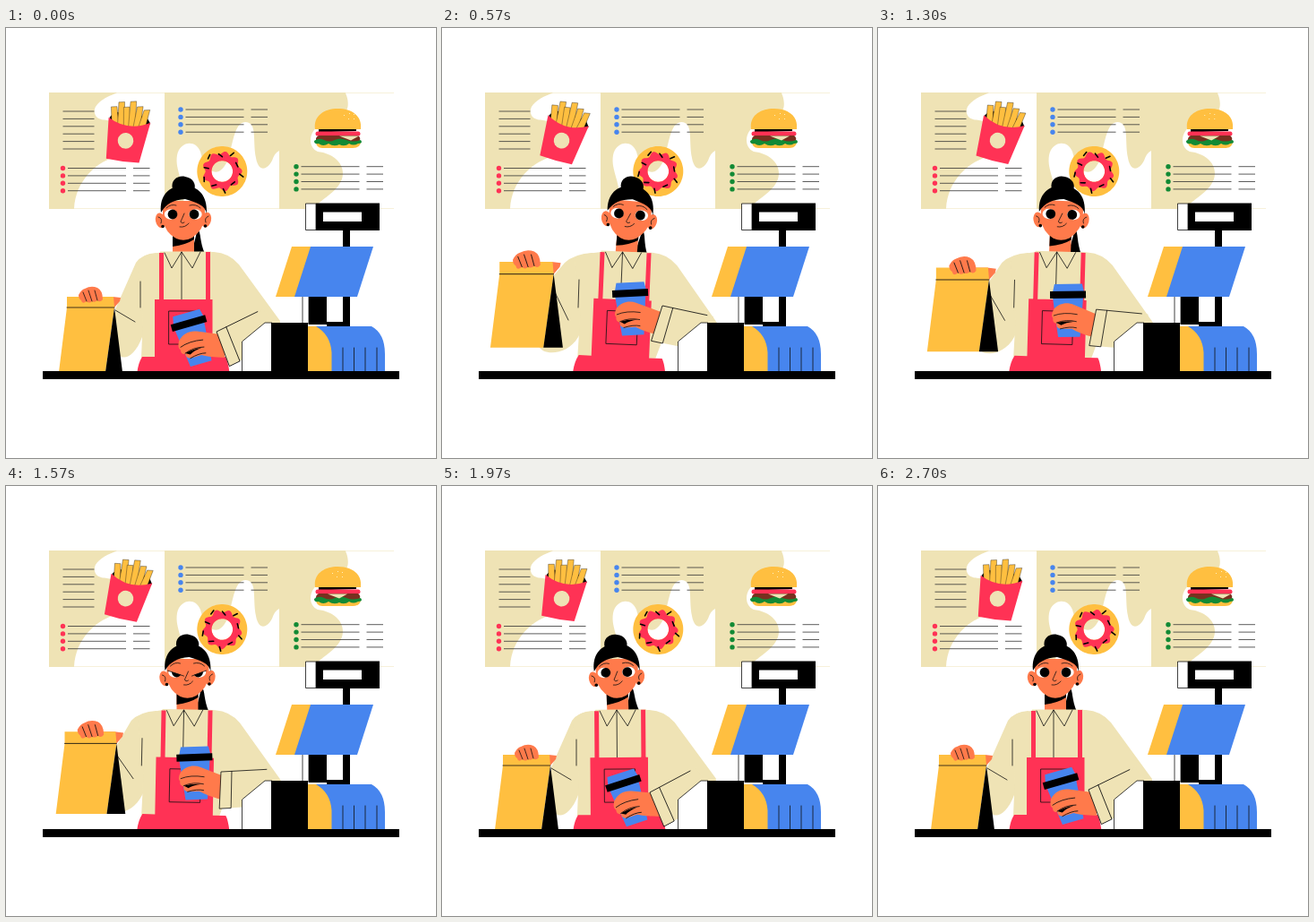
An HTML page that plays this animation: 480x480 px, repeating every 2730 ms.

```html
<!DOCTYPE html>
<html lang="en">
<head>
<meta charset="utf-8">
<title>Snack counter</title>
<style>
  html, body { margin: 0; width: 100%; height: 100%; overflow: hidden; background: #fff; }
  svg { display: block; width: 100%; height: 100%; }
  .beige { fill: #efe3b5; }
  .yellow { fill: #ffbf40; }
  .red { fill: #ff3255; }
  .blue { fill: #4785ee; }
  .green { fill: #128a35; }
  .skin { fill: #ff7a4b; }
  .white { fill: #fff; }
  .line { fill: none; stroke: #111; stroke-width: .8; stroke-linecap: round; stroke-linejoin: round; }
  .menu { stroke: #333; stroke-width: .8; }
</style>
</head>
<body>
<svg viewBox="0 0 480 480">
  <defs><clipPath id="aboveCounter"><path d="M0 0H480V383.500H0Z"/></clipPath></defs>

  <!-- menu boards -->
  <path class="beige" d="M48 72H433V202H48Z"/>
  <g class="white">
    <path d="M124 72.500C108 78 97 86 99 95C101 104 112 102 118 104V145C100 152 78 170 76 201.500H177V72.500Z"/>
    <path d="M198 201.500C201 172 188 160 191 142C194 126 212 124 217 138C222 160 238 172 248 146C254 126 255 106 267 105C281 105 275 125 279 145C282 162 292 158 297 148Q300 139 305 137V201.500Z"/>
    <path d="M379 72.500C384 84 382 95 375 95L350 108C336 118 338 134 348 138C365 140 376 150 376 162C376 181 352 190 343 201.500H434V72.500Z"/>
  </g>
  <g id="menu"></g>

  <g id="fries">
    <path d="M-22-24L-17-31L19-29L24-22L15-10H-15Z"/>
    <g id="sticks"></g>
    <path class="red" d="M-23-24Q0-10 24-23L16 23Q-3 24-21 22Z"/>
    <circle class="beige" cx="-1.500" r="8.800"/>
  </g>

  <g id="donut">
    <path id="dough" class="yellow" fill-rule="evenodd"/>
    <path id="icing" class="red" fill-rule="evenodd"/>
    <g id="sprinkles" stroke="#000" stroke-width="1.600" stroke-linecap="round"></g>
  </g>

  <g id="burger">
    <path class="yellow" d="M345 113C343 98 355 90 370.500 90S398 98 396 113ZM346 126H396Q396 134 387 134H353Q346 134 346 126Z"/>
    <path d="M349 113H391V115L349 116.500Z"/>
    <rect class="red" x="345.500" y="115.500" width="50" height="5" rx="2.500"/>
    <path fill="#78301f" d="M349 120H393Q397 123 394 127H347Q344 123 349 120Z"/>
    <path class="green" d="M344 126Q349 122 355 125T367 125T380 125T396 125Q399 129 393 129Q388 132 383 129Q378 133 372 130Q366 133 360 129Q354 133 349 129Q344 130 344 126Z"/>
    <g id="filling">
      <path class="beige" d="M360 120.500H382L373 125.500Z"/>
      <path fill="none" stroke="#fff0c0" stroke-width="1" d="M365 97l1 1m5-3l1 1m4 1l1-1m-7 5l1 1m5 0l1-1"/>
    </g>
  </g>

  <g clip-path="url(#aboveCounter)">
    <g id="head">
      <path d="M214 224C218 229 216 238 222 252H207Z"/>
      <path class="skin" d="M186 228H210V254H186Z"/>
      <path d="M186 232Q199 240 210 231V236Q201 242 186 244Z"/>
      <g class="skin">
        <ellipse cx="172.500" cy="215" rx="5.500" ry="8.500" transform="rotate(-12 172 215)"/>
        <ellipse cx="223.500" cy="214" rx="5.500" ry="8.500" transform="rotate(12 223 214)"/>
        <path d="M175 193V214Q178 229 190 235Q199 239 208 234Q221 225 222 210V193Z"/>
      </g>
      <path class="line" d="M170 211Q175 212 173 218M226 210Q221 212 223 217"/>
      <circle cx="175" cy="221.500" r="1.800"/><circle cx="222.500" cy="221" r="1.800"/>
      <ellipse class="white" cx="184" cy="208" rx="7.200" ry="5.700"/>
      <ellipse class="white" cx="211.500" cy="208" rx="7.200" ry="5.700"/>
      <circle cx="186" cy="208" r="5.400"/><circle cx="210" cy="208" r="5.400"/>
      <g id="lids">
        <path class="skin" d="M176 197H195V212L176 206ZM202 212L219 206V197H202Z"/>
        <path class="line" d="M176 206L194 212M203 212L219 206"/>
      </g>
      <path class="line" d="M179 201Q184 196 190 198M205 198Q212 196 217 201M199 207Q196 214 195 216Q196 219 199 217M194 222Q200 223 204 218"/>
      <path d="M173 206C171 186 183 176 198 176C215 176 225 187 224 207C222 198 214 195 200 191C187 192 179 196 173 206Z"/>
      <path d="M186 180C183 169 193 164 200 166C208 167 213 174 210 181Z"/>
    </g>

    <path id="leftSleeve" class="beige"/>
    <path id="body" class="beige" d="M164 252Q175 250 180 250H232Q249 251 260 264L306 327V340H248L238 368H151L153 320L146 262Q152 253 164 252Z"/>
    <g id="torso">
      <path class="beige" d="M172 249.500H229V305H172Z"/>
      <path class="line" d="M196 250V303M177 251L185 268L196 250L208 268L217 250"/>
      <path class="red" d="M171 251H176V304H171ZM223 250H228V304H223ZM166 303H230.500V367H245Q248 372 250 388H146Q147 375 152 367H166Z"/>
      <path class="line" d="M182 316H216V353H182Z"/>
    </g>
    <path id="sleeveCreases" class="line"/>

    <g id="cup">
      <path class="blue" d="M-15-30H16L18-21H-17ZM-17-15H17L13 29H-11.500Z"/>
      <path d="M-20-22H20V-14H-20Z"/>
      <path class="skin" d="M-16-2C-10-9-1-10 6-7L34 5L28 30C16 26 11 24 4 20H-8Q-14 19-13 14Q-18 13-17 8Q-20 5-16-2Z"/>
      <path d="M-13 13Q-4 11 7 12Q-3 13-8 16Z"/>
      <path class="line" d="M-16 5Q-5 1 10 4M-13 13Q-2 9 9 12M-9 20Q2 17 9 19"/>
    </g>
    <g id="forearm">
      <path class="beige" d="M0 0H58L64 40L-4 41Z"/>
      <path class="line" d="M51 0H0L-4 41H9L12 0"/>
    </g>

    <g id="bag">
      <path class="skin" d="M24 0L33 1L32 5L26 12H12V0Z"/>
      <path class="yellow" d="M-27 0H25L26 12L16 84H-36L-27 12Z"/>
      <path d="M26 12L35 84H16Z"/>
      <path class="line" d="M-27 12H26"/>
      <path class="skin" d="M-14-2Q-11-8-7-9Q0-13 7-10Q13-7 13 3Q10 7 7 4Q4 7 1 5Q-2 8-5 5Q-10 9-11 4Q-14 2-14-2Z"/>
      <path class="line" d="M-9-5L-5 5M-3-7L1 5M4-7L7 4"/>
    </g>
  </g>

  <!-- till -->
  <path d="M376 225H384V333H358V328H376Z"/>
  <path d="M338 298H358V331H338ZM346 195.500H417V226H346Z"/>
  <path class="white" stroke="#111" stroke-width=".8" d="M334.500 196H346V225.500H334.500ZM331 299H338V330H331Z"/>
  <path class="white" d="M354 205.500H397V216H354Z"/>
  <path class="yellow" d="M319 244H341L323 300H301Z"/>
  <path class="blue" d="M340 244H410L392 300H322Z"/>
  <path class="white" stroke="#111" stroke-width=".8" d="M263.500 384V350L289 329H297V384Z"/>
  <path d="M296 329H337V384H296Z"/>
  <path class="yellow" d="M337 333H350L364 350V384H337Z"/>
  <path class="blue" d="M346 333H408Q423 341 423 364V384H363.500V362Q362 342 346 333Z"/>
  <path class="line" d="M376 357V383M388.500 357V383M401 357V383M414 357V383"/>
  <path d="M41 383H439V392H41Z"/>
</svg>
<script>
const LOOP = 2730;
const $ = id => document.getElementById(id);
const set = (id, name, value) => $(id).setAttribute(name, value);
const move = (id, value) => set(id, 'transform', value);

const rules = (x, y, width) => `<path class="menu" d="M${x} ${y}h${width}"/>`;
const menuList = (color, x, y) => [0, 8.4, 16.8, 25.2].map(dy =>
  `<circle class="${color}" cx="${x}" cy="${y + dy}" r="2.700"/>` +
  rules(x + 5.5, y + dy, 65) + rules(x + 78.5, y + dy, 18.5)).join('');
$('menu').innerHTML =
  Array.from({ length: 6 }, (_, i) => rules(63.5, 93 + i * 8.4, 35)).join('') +
  menuList('red', 63.5, 156.5) + menuList('blue', 195, 91) + menuList('green', 324, 154.7);

// Each stick: foot x, top x, top y
$('sticks').innerHTML = [[-14, -18, -37], [-8, -10, -43], [-1, -4, -38], [4, 3, -45], [9, 11, -40], [14, 19, -37]]
  .map(([x, tx, ty]) => `<path class="yellow" stroke="#111" stroke-width=".35" d="M${x - 4}-12L${tx - 3.5} ${ty + 1}L${tx + 3} ${ty}L${x + 4}-12Z"/>`).join('');

// Closed ring outline; a wavy rim when lobes and depth are given.
function ring(radius, lobes = 0, depth = 0) {
  const points = Array.from({ length: 90 }, (_, i) => {
    const a = i * Math.PI / 45, r = radius + depth * Math.cos(lobes * a);
    return `${(r * Math.cos(a)).toFixed(1)} ${(r * Math.sin(a)).toFixed(1)}`;
  });
  return `M${points.join('L')}Z`;
}
const hole = ring(11.8);
set('dough', 'd', ring(28) + hole);
set('icing', 'd', ring(20.5, 9, 1.9) + hole);
$('sprinkles').innerHTML = Array.from({ length: 10 }, (_, i) =>
  `<path d="M-2.500 0H2.500" transform="rotate(${i * 36 + 12}) translate(${i % 2 ? 18 : 22}) rotate(${i * 67 + 25})"/>`).join('');

const keyTimes = [0, 330, 570, 970, 1570, 1970, 2700, 2730];
const poses = {
  lift:  [0, .84, 1, .95, .66, 0, 0, 0],
  lean:  [0, 2.2, 2.4, 2, 1.1, -.4, 0, 0],
  headX: [0, 9, 11, 8.5, 4.5, -3, 0, 0],
  headR: [0, 2.5, 5, 4.5, 0, -2, 0, 0],
  cupX:  [209, 210, 211, 213, 211, 208, 209, 209],
  cupY:  [347, 339, 314, 313, 321, 349, 347, 347],
  cupR:  [-16, -15, -3, 0, -2, -18, -16, -16],
  cuffX: [235, 237, 246, 246, 240, 232, 235, 235],
  cuffY: [339, 331, 310, 311, 319, 342, 339, 339],
  armR:  [-26, -14, 12, 11, -3, -28, -26, -26],
  fries: [6, 11, 14, 14, 12, 8, 6, 6],
  seeds: [12, 9, 6, 0, -1, 4, 12, 12]
};

// Smooth interpolation that never overshoots its keys.
function sample(values, t) {
  const slope = i => (values[i + 1] - values[i]) / (keyTimes[i + 1] - keyTimes[i]);
  const tangent = i => {
    if (i === 0 || i === keyTimes.length - 1) return 0;
    const a = slope(i - 1), b = slope(i);
    return a * b > 0 ? 2 * a * b / (a + b) : 0;
  };
  let i = 0;
  while (t >= keyTimes[i + 1]) i++;
  const span = keyTimes[i + 1] - keyTimes[i], u = (t - keyTimes[i]) / span;
  const ease = u * u * (3 - 2 * u);
  return values[i] + (values[i + 1] - values[i]) * ease +
    span * u * (1 - u) * ((1 - u) * tangent(i) - u * tangent(i + 1));
}

function draw(t) {
  const p = {};
  for (const name in poses) p[name] = sample(poses[name], t);
  const l = p.lift;

  move('fries', `translate(135 126) rotate(${p.fries})`);
  move('donut', `translate(241.300 160) rotate(${(p.fries - 6) * 2})`);
  move('filling', `translate(${p.seeds})`);
  move('head', `translate(${p.headX}) rotate(${p.headR} 198 213)`);
  move('torso', `rotate(${p.lean} 198 383)`);
  move('body', `rotate(${p.lean / 2} 198 383)`);
  move('cup', `translate(${p.cupX} ${p.cupY}) rotate(${p.cupR})`);
  move('forearm', `translate(${p.cuffX} ${p.cuffY}) rotate(${p.armR})`);
  move('bag', `translate(95 ${300 - 39 * l}) scale(${1 + .14 * l})`);

  set('leftSleeve', 'd', `M168 251Q${152 - 4 * l} 252 ${145 - 8 * l} 262L${122 + 3 * l} ${314 - 38 * l}L${122 - 14 * l} 355` +
    `C${124 - 12 * l} ${374 - 8 * l} ${142 - 2 * l} ${372 - 6 * l} 152 345L165 320Z`);
  set('sleeveCreases', 'd', `M${150 + 3 * l} ${283 - 2 * l}L${150 + 2 * l} 312` +
    `M${122 + 4 * l} ${315 - 20 * l}L${144 - 3 * l} ${328 - 2 * l}`);

  const blink = Math.max(0, 1 - Math.abs(t - 1585) / 95);
  set('lids', 'visibility', blink ? 'visible' : 'hidden');
  move('lids', `translate(0 ${6 * (blink - .84)})`);
}

const start = performance.now();
function tick() {
  draw((performance.now() - start) % LOOP);
  requestAnimationFrame(tick);
}
tick();
</script>
</body>
</html>
```
